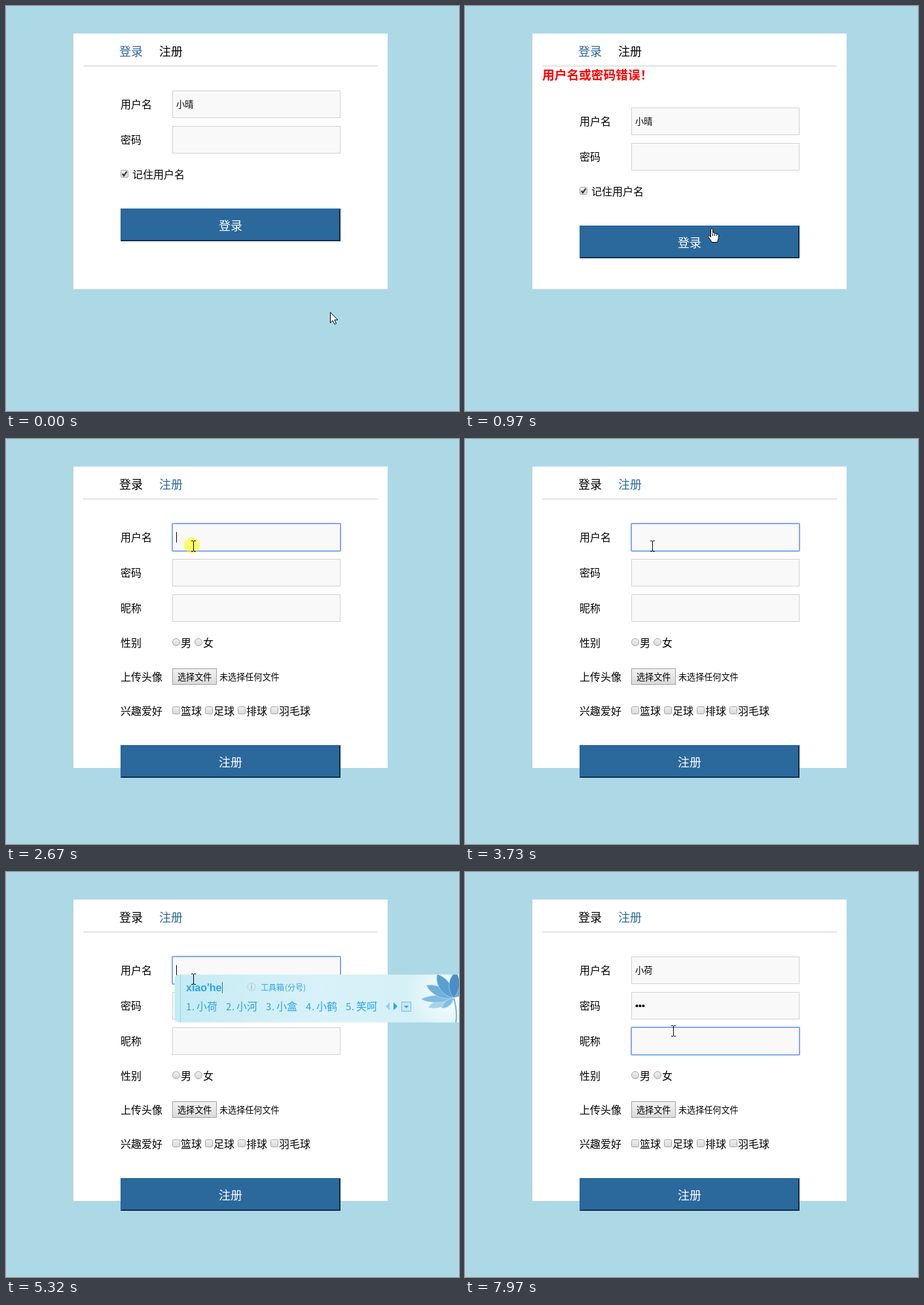
Write an HTML page with a canvas that moves like this. It is 692 by 618 pixels and loops after 8000 ms.

```html
<!DOCTYPE html>
<html lang="zh-CN">
<head>
<meta charset="utf-8">
<title>登录注册</title>
<style>
html, body { margin: 0; width: 100%; height: 100%; overflow: hidden; background: #add8e6; }
canvas { display: block; }
</style>
</head>
<body>
<canvas id="stage" width="692" height="618"></canvas>
<script>
const ctx = document.getElementById('stage').getContext('2d');
const LOOP = 8000;
const CJK = '"Noto Sans CJK SC", "Noto Sans CJK", sans-serif';
const BLUE = '#2b689c', INK = '#000';

// Main moments, in ms
const PRESS = 760, ERROR = 900, TAB = 1920, REGISTER = 2140, FOCUS = 2600;
const COMMIT = 5520, PASS = 6260, NICK = 7440;

// Pointer moves: start, end, from, to
const moves = [
  [70, 740, 495, 467, 376, 339],
  [1240, 1900, 376, 339, 247, 74],
  [2150, 2580, 247, 74, 286, 163],
  [5900, 6050, 286, 163, 308, 205],
  [7060, 7420, 308, 205, 318, 242]
];

// Pinyin input: time, typed letters, candidates
const typing = [
  [3790, 'x', '想 下 小 新 需'],
  [3910, 'xi', '西 系 洗 喜 细'],
  [4030, 'xia', '下 夏 吓 瞎 虾'],
  [4150, 'xiao', '小 消 笑 晓 校'],
  [4740, "xiao'h", '小孩 笑话 消耗 小号 销毁'],
  [4940, "xiao'he", '小荷 小河 小盒 小鹤 笑呵']
];

const within = (t, a, b) => t >= a && t < b;

function rect(x, y, w, h, color) {
  ctx.fillStyle = color;
  ctx.fillRect(x, y, w, h);
}

// Text placed by its left edge and the middle of its glyphs
function text(s, x, mid, size = 16, color = INK, weight = 400, family = CJK) {
  ctx.font = `${weight} ${size}px ${family}`;
  ctx.fillStyle = color;
  ctx.fillText(s, x, Math.round(mid + size * 0.38));
}

function frame(x, y, w, h, fill, line) {
  rect(x, y, w, h, line);
  rect(x + 1, y + 1, w - 2, h - 2, fill);
}

function poly(points, fill, line) {
  ctx.beginPath();
  for (let i = 0; i < points.length; i += 2) ctx.lineTo(points[i], points[i + 1]);
  ctx.closePath();
  ctx.fillStyle = fill;
  ctx.fill();
  if (line) {
    ctx.strokeStyle = line;
    ctx.lineWidth = 1;
    ctx.stroke();
  }
}

function fade(y0, y1, a, b) {
  const g = ctx.createLinearGradient(0, y0, 0, y1);
  g.addColorStop(0, a);
  g.addColorStop(1, b);
  return g;
}

function field(y, focused) {
  if (focused) {
    ctx.fillStyle = '#80aaf0';
    ctx.beginPath();
    ctx.roundRect(253, y - 1, 259, 44, 2);
    ctx.fill();
    rect(255, y + 1, 255, 40, '#f9f9f9');
  } else frame(254, y, 257, 42, '#f9f9f9', '#d0d0d0');
}

function button(label, y, pressed) {
  const dark = '#0e2f4c';
  if (pressed) frame(174, y - 1, 338, 52, BLUE, '#80aaf0');
  rect(175, y, 336, 50, pressed ? BLUE : dark);
  poly([175, y, 511, y, 509, y + 2, 177, y + 48, 175, y + 50], pressed ? dark : BLUE);
  rect(177, y + 2, 332, 46, BLUE);
  text(label, 325, y + 26, 18, '#fff');
}

function choice(x, y, size, round) {
  ctx.beginPath();
  ctx.roundRect(x + 0.5, y + 0.5, size - 1, size - 1, round ? size / 2 : 2);
  ctx.fillStyle = fade(y, y + size, '#f1f1f1', '#d8d8d8');
  ctx.fill();
  ctx.strokeStyle = '#a5a5a5';
  ctx.lineWidth = 1;
  ctx.stroke();
}

function panel(height, login) {
  rect(0, 0, 692, 618, '#add8e6');
  rect(103, 42, 480, height, '#fff');
  text('登录', 173, 69, 18, login ? BLUE : INK);
  text('注册', 234, 69, 18, login ? INK : BLUE);
  rect(118, 91, 450, 1, '#ccc');
}

function loginPage(t) {
  const dy = t >= ERROR ? 26 : 0;
  panel(390, true);
  if (dy) text('用户名或密码错误！', 118, 105, 18.72, '#f00', 700);
  text('用户名', 175, 150 + dy);
  field(129 + dy);
  text('小晴', 260, 150 + dy, 13.33);
  text('密码', 175, 204 + dy);
  field(183 + dy);
  choice(175, 250 + dy, 12);
  ctx.strokeStyle = '#383838';
  ctx.lineWidth = 2.2;
  ctx.beginPath();
  ctx.moveTo(177.8, 256 + dy);
  ctx.lineTo(180, 258.8 + dy);
  ctx.lineTo(184.5, 252.5 + dy);
  ctx.stroke();
  text('记住用户名', 193, 257 + dy);
  button('登录', 309 + dy, within(t, PRESS, ERROR));
}

function registerPage(t) {
  panel(460, false);
  const mids = [150, 204, 258, 311, 363, 415];
  ['用户名', '密码', '昵称', '性别', '上传头像', '兴趣爱好']
    .forEach((s, i) => text(s, 175, mids[i]));
  const active = t >= NICK ? 2 : t >= PASS ? 1 : t >= FOCUS ? 0 : -1;
  for (let i = 0; i < 3; i++) field(129 + 54 * i, i === active);

  if (t >= COMMIT) text('小荷', 260, 150, 13.33);
  const dots = [6800, 6900, 7000].filter(at => t >= at).length;
  for (let i = 0; i < dots; i++) {
    ctx.fillStyle = INK;
    ctx.beginPath();
    ctx.arc(262.5 + 5 * i, 204.3, 2, 0, 7);
    ctx.fill();
  }

  choice(254, 304, 12, true);
  text('男', 267, 311);
  choice(288, 304, 12, true);
  text('女', 301, 311);
  frame(254, 350, 68, 25, fade(350, 375, '#f3f3f3', '#dadada'), '#a0a0a0');
  text('选择文件', 262, 363, 13.1);
  text('未选择任何文件', 326, 363, 13.1);
  ['篮球', '足球', '排球', '羽毛球'].forEach((s, i) => {
    choice(254 + 50 * i, 408, 12);
    text(s, 267 + 50 * i, 415);
  });
  button('注册', 467, false);
  caret(t, active, dots);
}

function caret(t, active, dots) {
  let x = 260, on;
  if (active === 0) {
    on = t < COMMIT ? Math.floor((t - 2700) / 530) % 2 === 0 || t < 2700 : within(t, 5580, 6050);
    if (t >= COMMIT) x = 286;
  } else if (active === 1) {
    on = t < 6560 || t >= 6800;
    x += 5 * dots;
  } else on = active === 2 && t < 7970;
  if (on) rect(x, 142 + 54 * active, 1, 16, INK);
}

function petal(x, y, angle, length, width, color) {
  ctx.save();
  ctx.translate(x, y);
  ctx.rotate(angle * Math.PI / 180);
  ctx.beginPath();
  ctx.moveTo(0, 0);
  ctx.bezierCurveTo(length * 0.3, -width, length * 0.8, -width * 0.8, length, 0);
  ctx.bezierCurveTo(length * 0.7, width * 0.7, length * 0.3, width * 0.7, 0, 0);
  ctx.fillStyle = color;
  ctx.fill();
  ctx.strokeStyle = 'rgba(225,245,253,.6)';
  ctx.lineWidth = 0.7;
  ctx.stroke();
  ctx.restore();
}

function flower(right) {
  const x = right - 20, y = 192;
  const glow = ctx.createRadialGradient(x - 5, 188, 5, x - 5, 188, 70);
  glow.addColorStop(0, 'rgba(250,255,255,.9)');
  glow.addColorStop(1, 'rgba(250,255,255,0)');
  rect(right - 110, 156, 110, 74, glow);
  ctx.strokeStyle = '#5d9cc8';
  ctx.lineWidth = 1.5;
  ctx.beginPath();
  ctx.moveTo(x, y);
  ctx.quadraticCurveTo(x + 6, 212, x + 3, 232);
  ctx.stroke();
  petal(x, y, 160, 42, 10, '#a5d3ec');
  petal(x, y, 178, 50, 9, '#83bce0');
  petal(x, y, 205, 46, 12, '#70afd9');
  petal(x, y, 315, 42, 13, '#68a8d6');
  petal(x, y, 235, 44, 14, '#5a9fd2');
  petal(x, y, 275, 40, 13, '#4b8dc7');
  petal(x, y, 140, 24, 7, '#82bce2');
}

function inputWindow(t) {
  if (!within(t, typing[0][0], COMMIT)) return;
  const [, letters, list] = typing.filter(k => t >= k[0]).pop();
  const words = list.split(' ');
  const pitch = 29 + 16 * words[0].length;
  const end = 275 + 5 * pitch - 13;
  const right = end + 137, sky = '#2aa3ee';

  ctx.save();
  ctx.beginPath();
  ctx.roundRect(257.5, 156.5, right - 258, 73, 6);
  const g = ctx.createLinearGradient(257, 0, right, 0);
  g.addColorStop(0, '#c5ebf3');
  g.addColorStop(0.5, '#d9f1f8');
  g.addColorStop(1, '#d1f1f5');
  ctx.fillStyle = g;
  ctx.fill();
  ctx.save();
  ctx.clip();
  flower(right);
  rect(266, 156, 1, 74, '#94d8e8');
  ctx.restore();
  ctx.strokeStyle = '#a4dfec';
  ctx.lineWidth = 1;
  ctx.stroke();
  ctx.restore();

  text(letters, 275, 176, 16, sky, 700, '"Liberation Sans", Arial, sans-serif');
  rect(Math.round(276 + ctx.measureText(letters).width), 168, 1, 17, '#386b86');

  ctx.strokeStyle = '#bdccd2';
  ctx.beginPath();
  ctx.arc(375, 175, 6, 0, 7);
  ctx.stroke();
  text('i', 373.5, 175, 10, '#a9bac2', 700);
  text('工具箱', 389, 176, 12, sky);
  text('(分号)', 426, 176, 12, sky);

  words.forEach((word, i) => {
    const x = 275 + i * pitch;
    text(i + 1, x, 205, 15, sky, 300);
    text('.', x + 9, 205, 15, sky, 300);
    text(word, x + 16, 205, 16, sky, 300);
  });
  poly([end + 19, 199, end + 19, 211, end + 13, 205], '#96cfec');
  poly([end + 25, 199, end + 25, 211, end + 31, 205], sky);
  frame(end + 37, 198, 15, 15, '#c6e9f8', '#73bce5');
  poly([end + 41, 204, end + 48, 204, end + 44.5, 208], sky);
}

function pointerAt(t) {
  let x = 495, y = 467;
  for (const [a, b, x0, y0, x1, y1] of moves) {
    if (t < a) break;
    const p = Math.min(1, (t - a) / (b - a));
    const e = p * p * (3 - 2 * p);
    x = x0 + (x1 - x0) * e;
    y = y0 + (y1 - y0) * e;
  }
  return [Math.round(x), Math.round(y)];
}

function pointerKind(t, x, y) {
  if (within(t, ERROR, 970)) return 'arrow';
  const register = t >= REGISTER;
  const dy = !register && t >= ERROR ? 26 : 0;
  const top = register ? 467 : 309 + dy;
  if (x >= 175 && x < 511 && y >= top && y < top + 50) return 'hand';
  for (let i = 0; i < (register ? 3 : 2); i++) {
    const fy = 129 + 54 * i + dy;
    if (x >= 254 && x < 511 && y >= fy && y < fy + 42) return 'beam';
  }
  return 'arrow';
}

function pointer(t) {
  const [x, y] = pointerAt(t);
  const kind = pointerKind(t, x, y);
  const clicks = [[PRESS, ERROR], [TAB, 2060], [FOCUS, 2800], [PASS, 6320], [NICK, 7540]];
  if (clicks.some(([a, b]) => within(t, a, b))) {
    const off = kind === 'beam' ? 2 : 0;
    ctx.fillStyle = 'rgba(255,255,0,.57)';
    ctx.beginPath();
    ctx.arc(x - off, y - off / 2, 12, 0, 7);
    ctx.fill();
  }
  ctx.save();
  ctx.translate(x, y);
  if (kind === 'beam') {
    rect(0, -7, 1, 15, INK);
    for (const by of [-8, 8]) {
      rect(-3, by, 3, 1, INK);
      rect(1, by, 3, 1, INK);
    }
  } else if (kind === 'hand') {
    ctx.translate(-5, 0);
    ctx.beginPath();
    ctx.moveTo(4.5, 14);
    ctx.lineTo(4.5, 1.5);
    ctx.quadraticCurveTo(6, -0.7, 7.5, 1.5);
    ctx.lineTo(7.5, 7);
    ctx.quadraticCurveTo(9.5, 6, 10.5, 8);
    ctx.quadraticCurveTo(12.5, 7, 13.5, 9);
    ctx.quadraticCurveTo(16.5, 8, 16.5, 11);
    ctx.lineTo(16, 16);
    ctx.lineTo(14.5, 21.5);
    ctx.lineTo(6.5, 21.5);
    ctx.lineTo(0.7, 13.5);
    ctx.quadraticCurveTo(0, 10, 4.5, 13);
    ctx.closePath();
    ctx.fillStyle = '#fff';
    ctx.fill();
    ctx.strokeStyle = INK;
    ctx.lineWidth = 1;
    ctx.stroke();
    for (const fx of [7, 10, 13]) rect(fx, 8, 1, 4, INK);
  } else {
    poly([0.5, 0.5, 0.5, 16.5, 4.2, 13, 7, 18.7, 9.5, 17.5, 6.8, 12, 11.8, 12], '#fff', INK);
  }
  ctx.restore();
}

function draw(now) {
  const t = now % LOOP;
  if (t < REGISTER) loginPage(t);
  else registerPage(t);
  inputWindow(t);
  pointer(t);
  requestAnimationFrame(draw);
}
requestAnimationFrame(draw);
</script>
</body>
</html>
```
